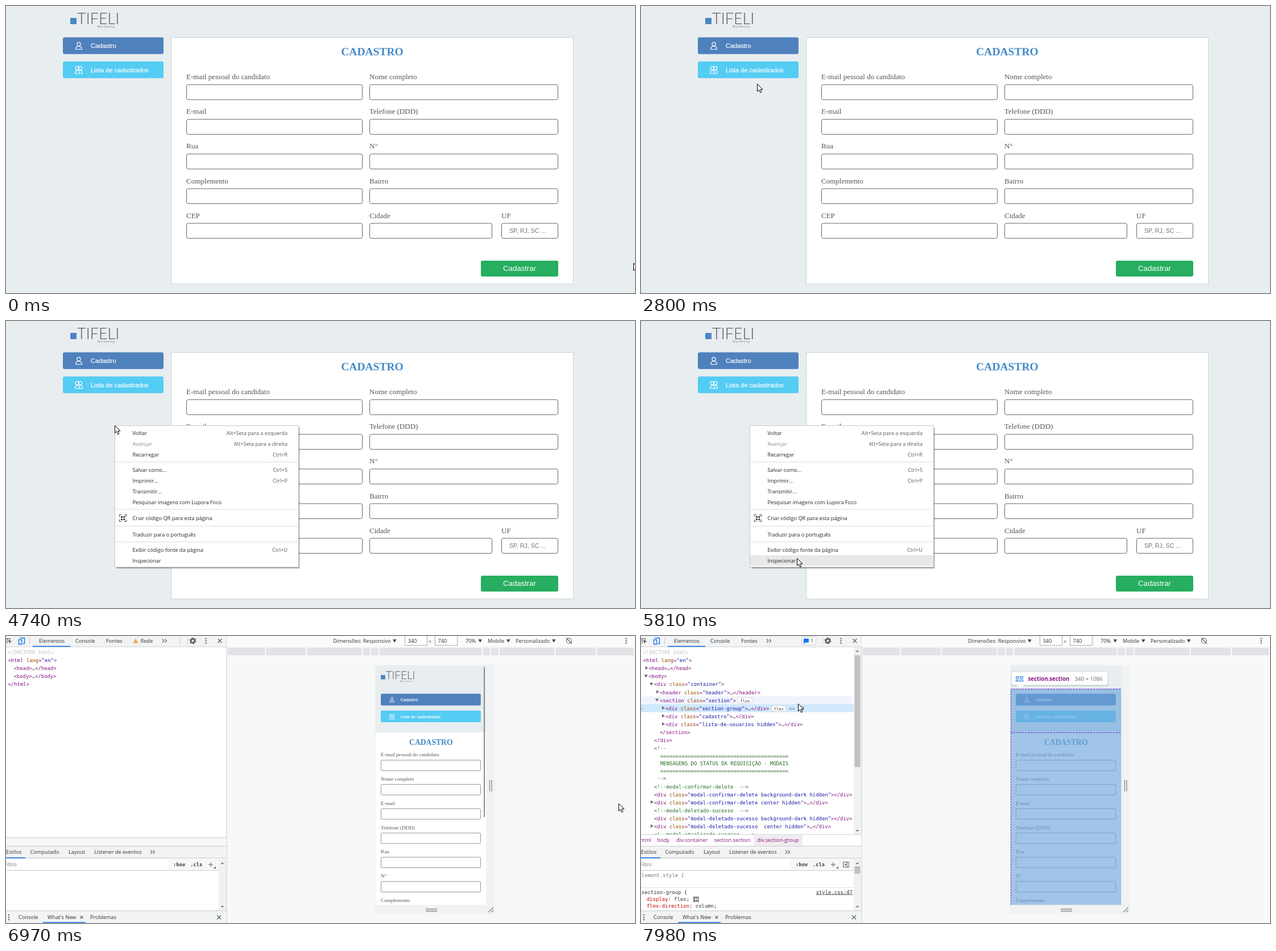
Animation, 1106 px wide and 506 px high, one loop 8000 ms. Source, as an HTML page:

```html
<!DOCTYPE html>
<html lang="pt">
<head>
<meta charset="utf-8">
<title>Cadastro</title>
<style>
html, body { margin: 0; width: 100%; height: 100%; overflow: hidden; background: #e8edf0; }
svg { display: block; }
text { white-space: pre; }
.serif { font-family: "Liberation Serif", Times, serif; }
.sans { font-family: "Liberation Sans", Arial, sans-serif; }
.ui { font-family: "Open Sans", "Noto Sans", sans-serif; }
.mono { font-family: "DejaVu Sans Mono", monospace; }
.thin { font-family: Lato, sans-serif; font-weight: 300; }
.bold { font-weight: 700; }
</style>
</head>
<body>
<svg id="stage" width="1106" height="506" viewBox="0 0 1106 506"></svg>
<script>
const LOOP = 8000;
const stage = document.getElementById('stage');

function el(parent, tag, attrs = {}) {
  const node = document.createElementNS('http://www.w3.org/2000/svg', tag);
  for (const k in attrs) node.setAttribute(k, attrs[k]);
  parent.append(node);
  return node;
}
const group = (p, attrs) => el(p, 'g', attrs);
const box = (p, x, y, width, height, fill, more = {}) =>
  el(p, 'rect', { x, y, width, height, fill, ...more });
const line = (p, d, stroke, width = 1, more = {}) =>
  el(p, 'path', { d, stroke, 'stroke-width': width, fill: 'none', ...more });
const shape = (p, d, fill, more = {}) => el(p, 'path', { d, fill, ...more });
function text(p, x, y, str, size, fill, cls, more = {}) {
  const node = el(p, 'text', { x, y, 'font-size': size, fill, class: cls, ...more });
  node.textContent = str;
  return node;
}
// interface text is placed by the middle of its line
const ui = (p, x, mid, str, fill = '#333', more = {}) =>
  text(p, x, mid + 3.2, str, 9.2, fill, 'ui', more);
const mono = (p, x, mid, str, fill = '#333', more = {}) =>
  text(p, x, mid + 3, str, 8.92, fill, 'mono', more);
const show = (node, on) => { node.style.display = on ? '' : 'none'; };

// ---------- web page ----------
function logo(p, dx = 0, dy = 0) {
  const g = group(p, { transform: `translate(${dx} ${dy})` });
  box(g, 113, 21, 11, 11, '#4a86c5');
  text(g, 125, 32, 'TIFELI', 27, '#5b565c', 'thin');
  text(g, 161, 38, 'Marketing', 5, '#77737a', 'ui', { 'letter-spacing': 0.8 });
}

function navButton(p, x, y, w, label, fill, pair) {
  const g = group(p);
  box(g, x, y, w, 29.5, fill, { rx: 3 });
  const person = (cx, d) => {
    el(g, 'circle', { cx, cy: y + 12, r: 3.1, stroke: '#fff', 'stroke-width': 1.2, fill: 'none' });
    line(g, d, '#fff', 1.2);
  };
  const b = y + 21.3;
  if (pair) {
    person(x + 25.3, `M${x + 21.7} ${b}v-1.5q0-4 3.7-4t3.8 4V${b}z`);
    person(x + 30.5, `M${x + 30} ${b}h4.2v-1.5q0-4-3.7-4`);
  } else {
    person(x + 28, `M${x + 22.8} ${b}v-1q0-4.500 5.200-4.500t5.200 4.500V${b}z`);
  }
  text(g, x + 49, y + 19, label, 11, '#fff', 'sans', { stroke: '#fff', 'stroke-width': 0.2 });
  return g;
}

function field(p, x, y, w, label) {
  text(p, x, y - 9.5, label, 13, '#555', 'serif');
  box(p, x + 0.5, y, w - 1, 26.500, '#fff', { rx: 3, stroke: '#666' });
}

const title = (p, x, y) =>
  text(p, x, y, 'CADASTRO', 19.5, '#4189c7', 'serif bold', { 'text-anchor': 'middle' });
const NAV = ['Cadastro', 'Lista de cadastrados'];
const BLUE = '#4f81bd', SKY = '#55ccf3';

const page = group(stage);
box(page, 0, 0, 1106, 506, '#e8edf0');
logo(page);
box(page, 290.5, 55.5, 707, 434.5, '#fff', { stroke: '#ccd2d4' });
title(page, 644, 86.5);
const ROWS = [
  ['E-mail pessoal do candidato', 'Nome completo'], ['E-mail', 'Telefone (DDD)'],
  ['Rua', 'N°'], ['Complemento', 'Bairro'], ['CEP', 'Cidade']
];
const inputs = [];
ROWS.forEach(([left, right], i) => {
  const y = 138.7 + 61.1 * i, w = i < 4 ? 332 : 216;
  field(page, 317, y, 310, left);
  field(page, 639, y, w, right);
  inputs.push([317, y, 310, 27], [639, y, w, 27]);
});
field(page, 871, 383.1, 100, 'UF');
inputs.push([871, 383, 100, 27]);
text(page, 885, 400, 'SP, RJ, SC ...', 10.67, '#757575', 'sans');
const submit = group(page);
box(submit, 835, 449, 136, 28, '#27ae60', { rx: 3 });
text(submit, 903, 467, 'Cadastrar', 13.2, '#fff', 'sans', { 'text-anchor': 'middle' });
const buttons = [
  [[100, 55, 177, 30], navButton(page, 100, 55.2, 177, NAV[0], BLUE)],
  [[100, 98, 177, 29], navButton(page, 100, 97.7, 177, NAV[1], SKY, true)],
  [[835, 449, 136, 28], submit]
];

// ---------- context menu ----------
const click = el(stage, 'circle', { cx: 191, cy: 184, r: 10, fill: '#ff0', 'fill-opacity': 0.47 });
const menu = group(stage);
box(menu, 195, 188, 321.5, 248.500, '#000', { opacity: 0.18 });
box(menu, 194, 187, 321.5, 248.500, '#000', { opacity: 0.4 });
box(menu, 191.5, 184.5, 323, 249.5, '#fff', { stroke: '#c9c9c9' });
const glow = box(menu, 192, 0, 322, 18.5, '#e8e8e8');
const MENU = [
  [198, 'Voltar', 'Alt+Seta para a esquerda'], [216.5, 'Avançar', 'Alt+Seta para a direita'],
  [235.5, 'Recarregar', 'Ctrl+R'], [263, 'Salvar como...', 'Ctrl+S'],
  [282, 'Imprimir...', 'Ctrl+P'], [300.5, 'Transmitir...'],
  [319.5, 'Pesquisar imagens com Lupora Foco'], [348, 'Criar código QR para esta página'],
  [376.5, 'Traduzir para o português'], [404, 'Exibir código fonte da página', 'Ctrl+U'],
  [422.5, 'Inspecionar']
];
for (const [y, label, keys] of MENU) {
  ui(menu, 222.5, y, label, label === 'Avançar' ? '#8c8c8c' : '#222');
  if (keys) ui(menu, 495, y, keys, '#5a5a5a', { 'text-anchor': 'end' });
}
for (const y of [248.5, 332, 361.5, 389.5]) line(menu, `M192 ${y}H514`, '#dcdcdc');
line(menu, 'M199.500 345v-3.500h3.500M208 341.500h3.500v3.500M211.500 350v3.500h-3.500M203 353.500h-3.500v-3.500', '#555', 1.2);
for (const [x, y] of [[202, 344], [206.3, 344], [202, 348.3], [206.3, 348.3]])
  box(menu, x, y, 3, 3, '#444');

// ---------- developer tools ----------
const tools = group(stage);
box(tools, 0, 0, 1106, 506, '#f7f9f9');
box(tools, 0, 0, 388, 506, '#fff');
line(tools, 'M388 0V506', '#c4c7ca');

const bars = group(tools);
const GREY = '#5f6368';
box(bars, 0, 0, 387.5, 18.5, '#f1f3f4');
line(bars, 'M0 19H388', '#cbcdd1');
box(bars, 47, 17.500, 66, 1.700, '#1a73e8');
line(bars, 'M0 4.500h7v3M2 13V4.500', GREY, 1.2);
shape(bars, 'M3.500 6.500l7 3-3 1.200-1.200 3z', GREY);
line(bars, 'M24.500 3.500h8v10h-3M22.500 6.500h5v8h-5z', '#1a73e8', 1.4);
line(bars, 'M41.500 3v12M319.500 3v12', '#cbcdd1');
[['Elementos', 58], ['Console', 122], ['Fontes', 176]].forEach(([s, x]) => ui(bars, x, 9, s));
el(bars, 'circle', { cx: 328.5, cy: 8.5, r: 3.400, stroke: GREY, 'stroke-width': 2.800, fill: 'none' });
el(bars, 'circle', { cx: 328.5, cy: 8.5, r: 5.300, stroke: GREY, 'stroke-width': 1.500, fill: 'none', 'stroke-dasharray': '2.500 3.050' });
const dots = (p, x, y) => [-4, 0, 4].forEach(d => el(p, 'circle', { cx: x, cy: y + d, r: 1.2, fill: GREY }));
const cross = (p, x, y, r) => line(p, `M${x - r} ${y - r}l${2 * r} ${2 * r}m0 ${-2 * r}l${-2 * r} ${2 * r}`, GREY, 1.3);
const more = (p, x, y) => line(p, `M${x - 4} ${y - 3}l3 3-3 3m4.500-6l3 3-3 3`, GREY, 1.1);
dots(bars, 351.5, 8.5);
cross(bars, 376, 8.5, 3.5);

// style pane and drawer
box(bars, 0, 370, 387.5, 21.5, '#f1f3f4');
box(bars, 0, 392, 387.500, 21, '#f6f7f8');
line(bars, 'M0 370.500H388M0 391.500H388M0 413.500H388M0 484.500H388', '#cbcdd1');
box(bars, 0, 390.300, 34, 1.700, '#1a73e8');
[['Estilos', 0], ['Computado', 42.5], ['Layout', 110], ['Listener de eventos', 155]]
  .forEach(([s, x]) => ui(bars, x, 381, s));
more(bars, 258, 381);
box(bars, 0, 485, 387.5, 21, '#f1f3f4');
dots(bars, 5, 496);
[['Console', 22], ['What\'s New', 73], ['Problemas', 148]].forEach(([s, x]) => ui(bars, x, 496, s));
cross(bars, 133, 496, 2.3);
cross(bars, 374.5, 496, 3.5);
line(bars, 'M65 505H140', '#1a73e8', 1.500);

function scrollbar(p, y, h, thumbY, thumbH) {
  box(p, 374, y, 13, h, '#f1f1f1');
  if (thumbH) box(p, 375.5, thumbY, 10, thumbH, '#c1c1c1');
  shape(p, `M377.500 ${y + 8}l3-3 3 3zM377.500 ${y + h - 8}l3 3 3-3z`, '#777');
}
function filterRow(p, w, x) {
  box(p, 0, 394, w, 17, '#fff');
  ui(p, -3, 403, 'Filtro', '#757575');
  mono(p, x, 403, ':hov', '#333', { 'font-weight': 600 });
  mono(p, x + 30, 403, '.cls', '#333', { 'font-weight': 600 });
  line(p, `M${x + 62} 403h8m-4-4v8`, GREY, 1.1);
  shape(p, `M${x + 75} 406v4h-4z`, GREY);
}

// markup line with coloured attributes
function markup(p, x, mid, src) {
  if (/^(<!|=|M| -)/.test(src)) {
    mono(p, x, mid, src, src.startsWith('<!D') ? '#c0c0c0' : '#236e25');
    return;
  }
  const row = mono(p, x, mid, '', '#881280');
  for (const part of src.split(/( class| lang|"[^"]*"|…)/)) {
    const fill = part[0] === '"' ? '#1a1aa6' : part[0] === ' ' ? '#994500' : part === '…' ? '#444' : '#881280';
    el(row, 'tspan', { fill }).textContent = part;
  }
}

const stub = group(tools);
['<!DOCTYPE html>', '<html lang="en">', '<head>…</head>', '<body>…</body>', '</html>']
  .forEach((s, i) => markup(stub, i === 2 || i === 3 ? 13.5 : 3.5, 29 + 14.05 * i, s));
box(stub, 0, 356, 387.5, 14, '#f6f7f8');
line(stub, 'M0 355.5H388', '#cbcdd1');
shape(stub, 'M228 4l4.500 8.500h-9z', '#f0a63a');
ui(stub, 236.5, 9, 'Rede');
more(stub, 279, 8.5);
line(stub, 'M306.500 3v12', '#cbcdd1');
filterRow(stub, 285, 294);
scrollbar(stub, 394, 90);

const full = group(tools);
const hoverRow = box(full, 0, 106.300, 372, 14, '#eff4fc', { rx: 5 });
box(full, 0, 120.300, 374, 14, '#cfe8fc');
const RULE = '='.repeat(42);
const TREE = [
  [3.5, '<!DOCTYPE html>'], [3.5, '<html lang="en">'], [13.5, '<head>…</head>', 'r'], [13.5, '<body>', 'd'],
  [23, '<div class="container">', 'd'], [33, '<header class="header">…</header>', 'r'],
  [33, '<section class="section">', 'd'], [43, '<div class="section-group">…</div>', 'r'],
  [43, '<div class="cadastro">…</div>', 'r'], [43, '<div class="lista-de-usuarios hidden">…</div>', 'r'],
  [33, '</section>'], [23, '</div>'], [23, '<!--'], [34, RULE],
  [34, 'MENSAGENS DO STATUS DA REQUISIÇÃO - MODAIS'], [34, RULE], [23, ' -->'],
  [23, '<!--modal-confirmar-delete  -->'],
  [23, '<div class="modal-confirmar-delete background-dark hidden"></div>'],
  [23, '<div class="modal-confirmar-delete center hidden">…</div>', 'r'],
  [23, '<!--modal-deletado-sucesso  -->'],
  [23, '<div class="modal-deletado-sucesso background-dark hidden"></div>'],
  [23, '<div class="modal-deletado-sucesso  center hidden">…</div>', 'r'],
  [23, '<!--modal-atualizado-sucesso  -->']
];
TREE.forEach(([x, src, arrow], i) => {
  // the lines of the block comment stand a little closer
  const y = 29 + 14.1 * i - 0.8 * Math.min(4, Math.max(0, i - 12));
  markup(full, x, y, src);
  if (arrow) shape(full, arrow === 'r' ? `M${x - 6} ${y - 4}l5 3-5 3z` : `M${x - 8} ${y - 3}h6.500l-3.250 5z`, '#6e6e6e');
});
function chip(x, mid) {
  box(full, x, mid - 5, 26, 10.5, '#fff', { rx: 5, stroke: '#ccc', 'stroke-width': 0.8 });
  text(full, x + 13, mid + 3, 'flex', 7, '#444', 'mono', { 'text-anchor': 'middle' });
}
chip(170, 113.5);
chip(229, 127.5);
mono(full, 260, 127.5, '== $0', '#777', { 'font-style': 'italic' });
mono(full, -2, 126, '…', '#777');
scrollbar(full, 20, 330, 34, 197);
box(full, 0, 350, 387.5, 20, '#fff');
box(full, 198, 351, 86, 19, '#f1ecef');
line(full, 'M0 350H388', '#cbcdd1');
[['html', -2], ['body', 28.5], ['div.container', 62], ['section.section', 128.5], ['div.section-group', 204]]
  .forEach(([s, x]) => ui(full, x, 360, s, '#881280'));
more(full, 225, 8.5);
box(full, 282.5, 1.500, 25, 14, '#fff', { rx: 2, stroke: '#cbcdd1' });
shape(full, 'M286 4.500h9v7h-6l-3 2.500z', '#1a73e8');
ui(full, 298, 8.5, '1');
filterRow(full, 262, 272);
line(full, 'M355.500 398.500h10v9h-10zM362.500 399v8', GREY);
shape(full, 'M360.500 400.500v5l-3-2.500z', GREY);
scrollbar(full, 394, 90, 406, 13);
mono(full, -4.6, 421.5, 'element.style {', '#777');
line(full, 'M0 443.500H374', '#dfe1e4');
mono(full, -4.6, 451.5, '.section-group {');
mono(full, 372, 451.5, 'style.css:47', '#333', { 'text-anchor': 'end', 'text-decoration': 'underline' });
[['display', ': flex;', 464], ['flex-direction', ': column;', 476]].forEach(([name, value, y]) => {
  const row = mono(full, 10, y, name, '#c80000');
  el(row, 'tspan', { fill: '#333' }).textContent = value;
});
box(full, 92, 459.500, 9.500, 9.500, '#777');
line(full, 'M93 464h8M95.500 461v7M98.500 461v7', '#fff');

// device bar
box(bars, 388.5, 0, 718, 18.5, '#fafbfb');
box(bars, 390, 20.5, 714, 13.5, '#e1e3e6');
for (const x of [456, 528, 626.5, 641, 655.5, 837.5, 852, 867, 965.5, 1038])
  line(bars, `M${x} 20.500V34`, '#fff', 1.500);
[['Dimensões: Responsivo', 575, 683], ['70%', 808, 833.5], ['Mobile', 847, 883], ['Personalizado', 896, 963]]
  .forEach(([s, x, tip]) => {
    ui(bars, x, 9, s);
    shape(bars, `M${tip - 3} 6h6.500l-3.250 5.500z`, '#444');
  });
[['340', 701.5], ['740', 754.5]].forEach(([s, x]) => {
  box(bars, x, -1, 39, 17.5, '#fff', { stroke: '#a9adb2' });
  ui(bars, x + 5, 9, s);
});
ui(bars, 743, 9.5, '×', GREY);
el(bars, 'circle', { cx: 990, cy: 8.5, r: 4.5, stroke: GREY, fill: 'none', 'stroke-width': 1.1 });
line(bars, 'M985 3.500l10 10', GREY, 1.2);
dots(bars, 1090.5, 8.5);

// phone
const phone = group(tools);
box(phone, 649, 51, 211, 439, '#f0f2f3');
line(phone, 'M850.500 254v20M854 254v20M738 481.500h20M738 485h20M848 487l9-9M853 487l4-4', '#888', 1.300);
const screen = el(phone, 'svg', { x: 650, y: 52, width: 194.4, height: 422, viewBox: '0 0 277.700 602.860', overflow: 'hidden' });
box(screen, 0, 0, 278, 603, '#fff');
box(screen, 0, 0, 278, 168.5, '#e8edf0');
logo(screen, -100, 3);
navButton(screen, 13, 71.2, 251, NAV[0], BLUE);
navButton(screen, 13, 113.5, 251, NAV[1], SKY, true);
title(screen, 139, 199.5);
['E-mail pessoal do candidato', 'Nome completo', 'E-mail', 'Telefone (DDD)', 'Rua', 'N°', 'Complemento']
  .forEach((s, i) => field(screen, 13, 238.5 + 61.1 * i, 251, s));
const thumb = box(phone, 840, 55, 2, 264, '#8b8b8b');

// element highlight
const mark = group(tools);
box(mark, 650, 93, 194.4, 381, '#6fa8dc', { 'fill-opacity': 0.66 });
line(mark, 'M650.500 474V93.500H844M650 170.500H844', '#7a1fd0', 1, { 'stroke-dasharray': '3 2' });
box(mark, 651, 63.500, 171, 25, '#000', { rx: 3, opacity: 0.12 });
box(mark, 651.5, 62.5, 169.5, 24, '#fff', { rx: 3, stroke: '#d5d9dc' });
shape(mark, 'M660.500 86.500h13l-6.500 6.500z', '#fff');
line(mark, 'M659.500 71.500h5v3h-5zM667 71.500h4.500v3H667zM659.500 77h3v3h-3zM665 77h6.500v3H665z', '#1a73e8');
text(mark, 680.5, 79, 'section.section', 9.7, '#881280', 'ui bold');
text(mark, 762.5, 78.8, '340 × 1086', 9.7, '#666', 'ui');

// ---------- pointer ----------
const pointer = group(stage);
const pen = { stroke: '#000', 'stroke-width': 1, 'stroke-linejoin': 'round' };
const looks = {
  arrow: shape(pointer, 'M.5 .5V13.500l3-2.700 2.200 5 2.200-1-2.200-4.800H10z', '#fff', pen),
  hand: shape(pointer, 'M-1 1q1.500-1.500 2.500 0v5l6 1.500q1.500.5 1 3l-1 5.500h-6l-5.500-6q0-2 3-.5z', '#fff', pen),
  beam: line(pointer, 'M-3-8h2.500l.5.500.5-.5H3M0-7.500v15M-3 8h2.500L0 7.500l.5.500H3', '#222')
};
// time, x, y
const PATH = [
  [0, 1103, 453], [60, 1100, 447], [310, 1071, 383], [620, 1069, 380], [900, 985, 235], [1250, 897, 95],
  [1400, 905, 107], [1470, 906, 118], [2260, 920, 454], [2440, 923, 462], [2630, 915, 455],
  [2790, 204, 137], [2870, 204, 137], [3100, 198, 76], [3430, 186, 64], [3490, 184, 70],
  [3810, 174, 162], [3870, 174, 162], [4030, 182, 197], [4250, 191, 187], [4310, 191, 184],
  [4900, 191, 184], [4920, 193, 182], [5070, 194, 183], [5200, 207, 196], [5500, 245, 310],
  [5800, 274, 418], [6050, 274, 418], [6400, 690, 370], [6780, 1081, 318], [6960, 1077, 295],
  [7040, 1077, 295], [7150, 1083, 298], [7600, 994, 265], [7670, 930, 240], [7900, 380, 140],
  [7980, 276, 119], [LOOP, 276, 119]
];
function pointAt(t) {
  const i = PATH.findIndex(k => k[0] > t);
  const [a, b] = [PATH[i - 1], PATH[i]];
  const f = (t - a[0]) / (b[0] - a[0]);
  return [1, 2].map(n => Math.round(a[n] + (b[n] - a[n]) * f));
}
const inside = ([x, y, w, h], px, py) => px >= x && px < x + w && py >= y && py < y + h;

function draw(t) {
  const [x, y] = pointAt(t);
  const onPage = t < 4560;
  let look = onPage && inputs.some(r => inside(r, x, y)) ? 'beam' : 'arrow';
  for (const [area, node] of buttons) {
    const over = onPage && inside(area, x, y);
    if (over) look = 'hand';
    node.style.filter = over ? 'brightness(.92)' : '';
  }
  for (const k in looks) show(looks[k], k === look);
  pointer.setAttribute('transform', `translate(${x} ${y})`);

  show(click, t >= 4560 && t < 4740);
  show(menu, t >= 4740 && t < 5990);
  const item = x > 192 && MENU.find(m => Math.abs(m[0] - y) < 9.3 && m[1] !== 'Avançar');
  show(glow, item);
  if (item) glow.setAttribute('y', item[0] - 9.5);

  show(tools, t >= 6150);
  show(bars, t >= 6350);
  show(phone, t >= 6500);
  show(stub, t >= 6600 && t < 7100);
  show(full, t >= 7100);
  const overTree = t >= 7100 && x < 388;
  show(hoverRow, overTree);
  show(mark, overTree);
  show(thumb, !overTree);
}

const start = performance.now();
function tick() {
  draw((performance.now() - start) % LOOP);
  requestAnimationFrame(tick);
}
tick();
</script>
</body>
</html>
```
